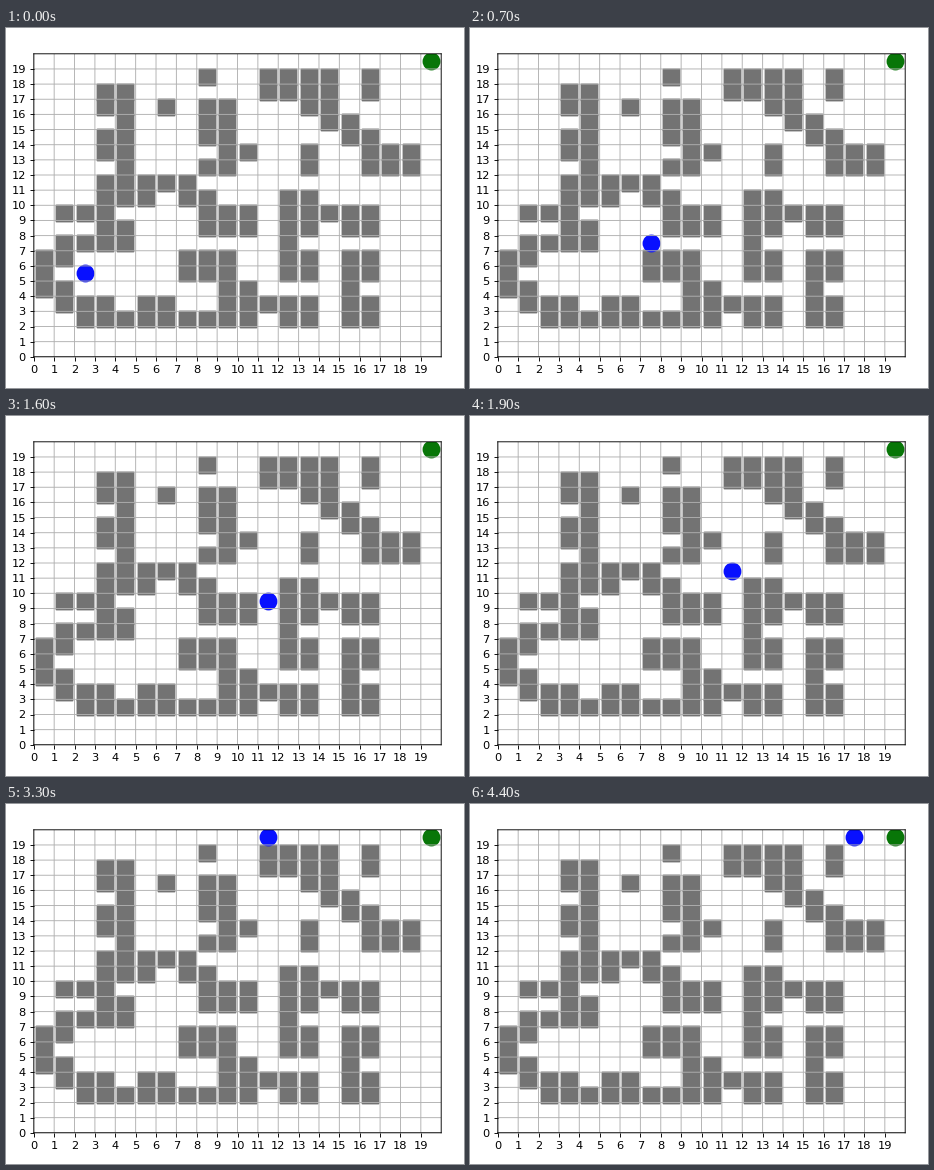
Write a matplotlib script that moves like this. It is 458 px wide and 360 px high and loops after 4.7 s.

```python
import math

import matplotlib.pyplot as plt
import numpy as np
from matplotlib.animation import FuncAnimation

W, H, DPI = 458, 360, 64
PX = 72 / DPI  # points per pixel
FRAMES, STEP_MS = 47, 100
SIZE = 20
LEFT, RIGHT, TOP, BOTTOM = 27.8, 435.2, 25.8, 328.8
LINE = 0.91 * PX

WALL, GRID = "#737373", "#b0b0b0"
AGENT, GOAL = "#0810ff", "#087608"


def walk(*corners, stairs=False):
    """List the cells from corner to corner; diagonals may become stairs."""
    cells = [corners[0]]
    for end in corners[1:]:
        while cells[-1] != end:
            x, y = cells[-1]
            dx, dy = (int(d) for d in np.sign(np.subtract(end, cells[-1])))
            if stairs and dx and dy:
                cells.append((x + dx, y))
            cells.append((x + dx, y + dy))
    return cells


def thin(*corners):
    return set(walk(*corners, stairs=True))


def thick(*corners):
    """A wall drawn with a brush of two by two cells."""
    return {(x + i, y + j) for x, y in walk(*corners)
            for i in (0, 1) for j in (0, 1)}


def build_walls():
    walls = set()
    # Stacks of blocks, three rows apart
    for col, first, last in [(3, 7, 16), (12, 2, 8), (15, 2, 8)]:
        for row in range(first, last + 1, 3):
            walls |= thick((col, row))
    # West: the long bent wall and its branches
    walls |= thin((4, 7), (2, 7), (0, 5), (0, 4), (2, 2), (10, 2))
    walls |= thin((3, 7), (3, 9), (1, 9))
    walls |= thin((4, 17), (4, 11), (7, 11), (7, 10), (8, 9))
    walls |= thick((2, 2)) | thick((4, 10)) | thin((5, 3), (6, 3))
    # Middle
    walls |= thick((7, 5), (8, 5)) | thick((8, 8), (9, 8))
    walls |= thick((9, 2), (9, 3)) | thin((9, 3), (13, 3))
    walls |= thick((8, 14), (8, 15)) | thin((8, 12), (9, 12), (9, 13), (10, 13))
    walls |= thin((6, 16)) | thin((8, 18))
    # East
    walls |= thin((13, 10), (12, 10), (12, 5)) | thin((12, 9), (16, 9))
    walls |= thin((15, 2), (15, 6)) | thin((13, 12), (13, 13))
    walls |= thick((11, 17), (13, 17), (13, 16)) | thin((16, 17), (16, 18))
    walls |= thin((14, 15), (16, 13)) | thick((16, 12), (17, 12))
    return walls


def move_tick(n):
    """Tick of move n: at most one move per tick, then a steady pace."""
    return max(n, math.floor(1.77 * n - 1.51))


def centers(cells):
    return np.array(sorted(cells)) + 0.5


def add_markers(ax, cells, shape, color):
    x, y = centers(cells).T
    marks = ax.scatter(x, y, s=(16.14 * PX) ** 2, marker=shape,
                       color=color, linewidths=1.71 * PX)
    marks.set_snap(False)
    return marks


fig = plt.figure(figsize=(W / DPI, H / DPI), dpi=DPI, facecolor="white")
ax = fig.add_axes([LEFT / W, 1 - BOTTOM / H,
                   (RIGHT - LEFT) / W, (BOTTOM - TOP) / H])
ax.set_axisbelow("line")

route = walk((2, 5), (4, 5), (6, 7), (10, 7), (11, 8),
             (11, 15), (10, 16), (10, 18), (11, 19), (17, 19))
add_markers(ax, build_walls(), "s", WALL)
add_markers(ax, [(SIZE - 1, SIZE - 1)], "o", GOAL)
agent = add_markers(ax, route[:1], "o", AGENT)

ax.set(xlim=(0, SIZE), ylim=(0, SIZE),
       xticks=range(SIZE), yticks=range(SIZE))
ax.tick_params(labelsize=11.41 * PX, labelfontfamily="DejaVu Sans",
               length=4 * PX, pad=4 * PX, width=LINE)
ax.grid(color=GRID, linewidth=LINE)
for line in ax.get_xgridlines() + ax.get_ygridlines():
    line.set_snap(False)
for line in ax.get_xticklines() + ax.get_yticklines():
    line.set_snap(False)
for spine in ax.spines.values():
    spine.set_linewidth(LINE)
    spine.set_snap(False)


def draw(tick):
    done = sum(move_tick(n) <= tick for n in range(1, len(route)))
    agent.set_offsets(centers([route[done]]))
    return (agent,)


anim = FuncAnimation(fig, draw, frames=FRAMES, interval=STEP_MS,
                     repeat=True, repeat_delay=0)
plt.show()
```
